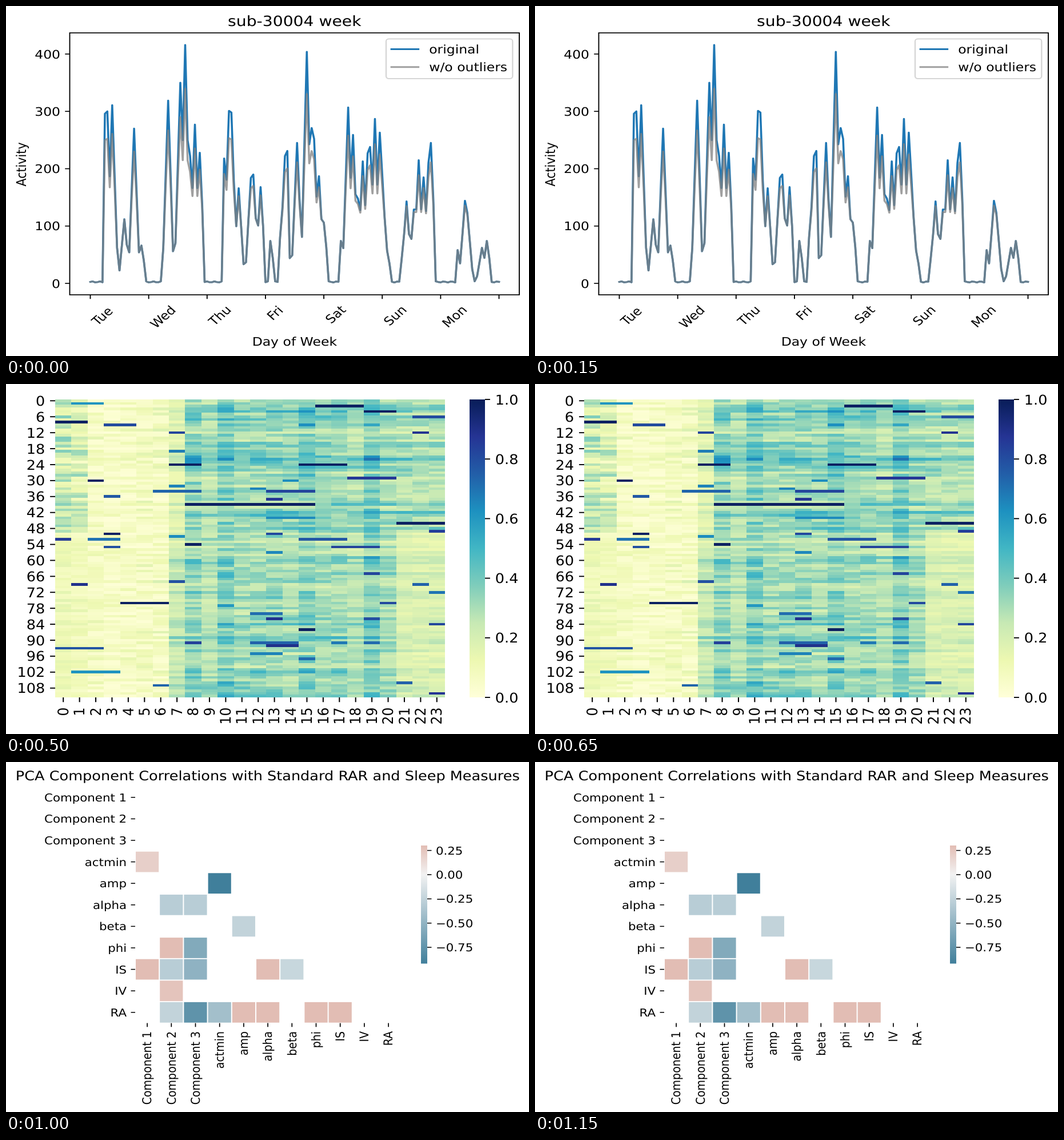
Write an HTML page that moves like this. It is 915 px wide and 612 px high and loops after 1250 ms.

```html
<!DOCTYPE html>
<html lang="en">
<head>
<meta charset="utf-8">
<title>Activity charts</title>
<style>
  html, body { margin: 0; width: 100%; height: 100%; overflow: hidden; background: #fff; }
  svg { display: block; width: 915px; height: 612px; font: 10px "DejaVu Sans", sans-serif; text-rendering: geometricPrecision; }
  .scene { visibility: hidden; animation: show 1250ms step-end infinite; }
  @keyframes show { 0% { visibility: visible; } 20%, 100% { visibility: hidden; } }
</style>
</head>
<body>
<svg viewBox="0 0 915 612"></svg>
<script>
const svg = document.querySelector('svg');
const BLUE = '#1f77b4', ORANGE = '#ff7f0e', GREEN = '#2ca02c', GRAY = '#808080';
const range = (n, f = i => i) => Array.from({ length: n }, (_, i) => f(i));

function add(parent, tag, attrs, text) {
  const node = document.createElementNS('http://www.w3.org/2000/svg', tag);
  for (const k in attrs) node.setAttribute(k, attrs[k]);
  if (text !== undefined) node.textContent = text;
  return parent.appendChild(node);
}

// A chart drawn in points (sx, sy pixels each); helpers take stage pixels.
let sceneCount = 0;
function scene(sx, sy) {
  const g = add(svg, 'g', {
    class: 'scene', transform: `scale(${sx} ${sy})`,
    style: `animation-delay:${(sceneCount++ - 5) * 250}ms`
  });
  const s = {
    g,
    line(points, stroke, more) {
      const d = 'M' + points.map(([x, y]) => `${x / sx} ${y / sy}`).join('L');
      add(g, 'path', {
        d, stroke, fill: 'none', 'stroke-width': 1.5,
        'stroke-linejoin': 'round', 'stroke-linecap': 'square', ...more
      });
    },
    rect(x, y, w, h, attrs) {
      add(g, 'rect', { x: x / sx, y: y / sy, width: w / sx, height: h / sy, ...attrs });
    },
    text(str, x, y, anchor = 'middle', turn = 0, size = 10) {
      add(g, 'text', {
        transform: `translate(${x / sx} ${y / sy}) rotate(${turn})`,
        'text-anchor': anchor, 'font-size': size
      }, str);
    },
    frame(x0, y0, x1, y1) {
      s.rect(x0, y0, x1 - x0, y1 - y0, { fill: 'none', stroke: '#000', 'stroke-width': 0.8 });
    },
    tick(x, y, dx, dy) {
      s.line([[x, y], [x + dx * 3.5 * sx, y + dy * 3.5 * sy]], '#000',
        { 'stroke-width': 0.8, 'stroke-linecap': 'butt' });
    },
    xTick(x, y, label) {
      s.tick(x, y, 0, 1);
      s.text(label, x, y + 15 * sy);
    },
    xTickTurned(x, y, label) {
      s.tick(x, y, 0, 1);
      s.text(label, x + 3.4 * sx, y + 7.5 * sy, 'end', -90);
    },
    yTick(x, y, label, side = -1) {
      s.tick(x, y, side, 0);
      s.text(label, x + side * 7 * sx, y + 3.65 * sy, side < 0 ? 'end' : 'start');
    },
    legend(x, y, w, h, firstY, stepY, items) {
      s.rect(x, y, w, h, { rx: 2, fill: '#fff', 'fill-opacity': 0.8, stroke: '#ccc', 'stroke-opacity': 0.8 });
      items.forEach(([label, color, more], i) => {
        const ly = firstY + i * stepY, lx = x + 4 * sx;
        s.line([[lx, ly], [lx + 20 * sx, ly]], color, more);
        s.text(label, lx + 28 * sx, ly + 3.5 * sy, 'start');
      });
    }
  };
  return s;
}

const mix = (a, b, t) => `rgb(${a.map((v, i) => Math.round(v + (b[i] - v) * t))})`;

function gradient(s, id, stops) {
  const grad = add(s.g, 'linearGradient', { id, x1: 0, y1: 0, x2: 0, y2: 1 });
  stops.forEach(([offset, color]) => add(grad, 'stop', { offset, 'stop-color': color }));
}

// Bursts of activity in each waking stretch, as hour of week: height.
const bursts = [
  { 6: 296, 7: 300, 9: 311, 14: 112, 18: 270, 21: 66 },
  { 30: 62, 32: 319, 34: 56, 37: 350, 39: 416, 41: 223, 43: 277, 45: 228 },
  { 55: 218, 57: 301, 58: 298, 61: 166, 66: 184, 67: 190, 70: 168 },
  { 74: 74 },
  { 78: 80, 80: 222, 81: 231, 82: 44, 85: 245, 89: 404, 91: 271, 92: 252, 94: 187, 96: 106 },
  { 103: 74, 106: 307, 108: 259, 110: 148, 112: 213, 114: 227, 115: 238, 117: 287, 119: 263, 120: 190, 122: 57 },
  { 128: 43, 130: 143, 133: 129, 135: 215, 137: 185, 139: 210, 140: 245 },
  { 151: 58, 154: 144, 155: 123, 161: 62, 163: 74 }
];

// Each burst fades over about two hours on either side; sleep stays near zero.
function weekValues() {
  const values = range(169, i => 2.5 + Math.sin(i * 2));
  for (const stretch of bursts) {
    const hours = Object.keys(stretch).map(Number);
    for (let h = hours[0]; h <= hours.at(-1) + 1; h++) {
      const tents = hours.map(k => stretch[k] * (1 - 0.4 * Math.abs(h - k)));
      values[h] = stretch[h] ?? Math.max(values[h], ...tents);
    }
  }
  return values;
}

function week() {
  const s = scene(2.35, 2.065);
  const px = h => 147.5 + h * 4.256, py = v => 485 - v * 1.0025;
  const values = weekValues();
  const trim = v => v - 0.25 * Math.max(0, v - 110);
  const soft = { 'stroke-opacity': 0.75 };
  s.line(values.map((v, i) => [px(i), py(v)]), BLUE);
  s.line(values.map((v, i) => [px(i), py(trim(v))]), GRAY, soft);
  s.frame(111.5, 47, 898, 505);
  for (let v = 0; v <= 400; v += 100) s.yTick(111.5, py(v), v);
  const names = { Tue: 18.6, Wed: 22, Thu: 18.8, Fri: 12.5, Sat: 16.4, Sun: 19, Mon: 21.1 };
  Object.entries(names).forEach(([name, width], i) =>
    s.text(name, px(i * 24) + 12.6, 521.5 + (width + 7.6) * 1.46, 'start', -45));
  range(8, i => s.tick(px(i * 24), 505, 0, 1));
  s.text('sub-30004 week', 504.8, 35, 'middle', 0, 12);
  s.text('Day of Week', 504.8, 593.5);
  s.text('Activity', 35, 277, 'middle', -90);
  s.legend(665, 57.5, 221.3, 69.5, 75.5, 31.2, [['original', BLUE], ['w/o outliers', GRAY, soft]]);
}

function dayProfile() {
  const s = scene(2.35, 2.164);
  const px = h => 147.5 + h * 31.1, py = v => 510 - v * 2.1875;
  const steps = a => a.flatMap((v, i) => i ? [[px(i), py(a[i - 1])], [px(i), py(v)]] : [[px(0), py(v)]]);
  const hourly = [44, 10, 21, 2, 2, 10.5, 69.5, 146, 138, 181, 176, 144.5,
    139, 167.5, 114, 155, 148, 201, 194.5, 197, 162.5, 118, 111.5, 56];
  // Outliers weigh most in the morning.
  const trim = (v, h) => v * (h < 6 ? 0.96 : Math.min(0.92, 0.81 + 0.02 * (h - 6)));
  s.line(steps(hourly), BLUE);
  s.line(steps(hourly.map(trim)), GRAY);
  s.frame(111.5, 48.5, 898, 528);
  for (let v = 0; v <= 200; v += 25) s.yTick(111.5, py(v), v);
  for (let h = 0; h <= 20; h += 5) s.xTick(px(h), 528, h);
  s.text('sub-30004 24 hr', 504.8, 36, 'middle', 0, 12);
  s.text('Hour', 504.8, 593);
  s.text('Activity', 35, 289, 'middle', -90);
  s.legend(123, 59.5, 221.3, 39.8, 79, 0, [['w/o outliers', GRAY]]);
}

// Hourly means in thousandths for the high and low groups.
const high = [265, 187, 132, 86, 94, 125, 141, 254, 460, 388, 523, 428,
  440, 459, 439, 528, 456, 466, 428, 537, 433, 351, 333, 341];
const low = [210, 205, 171, 155, 168, 205, 200, 252, 312, 248, 328, 275,
  283, 273, 250, 295, 263, 250, 203, 316, 241, 198, 197, 219];
const mean = high.map((v, i) => (v + low[i]) / 2);

const ramp = [[255, 255, 217], [237, 248, 177], [199, 233, 180], [127, 205, 187], [65, 182, 196],
  [29, 145, 192], [34, 94, 168], [37, 52, 148], [8, 29, 88]];
function rampColor(v) {
  const t = Math.min(1, Math.max(0, v)) * 8, i = Math.min(7, Math.floor(t));
  return mix(ramp[i], ramp[i + 1], t - i);
}

function heatValues() {
  let seed = 4217;
  const rand = () => (seed = seed * 16807 % 2147483647) / 2147483647;
  const rows = range(112, r => {
    const late = r >= 50;
    const wave = Math.cos((r - 2) / 20.6 * 2 * Math.PI) * (1 - r / 150);
    const gain = (1 + 0.2 * wave) * (0.75 + 0.4 * rand());
    let drift = 0.5;
    return mean.map((m, h) => {
      const base = m / 1000;
      drift += (rand() - drift) * 0.6;
      if (h < 2) return base * (late ? 0.15 + 0.7 * drift : 0.2 + 2 * drift ** 1.4);
      if (h < 7) return base * (0.05 + 1.4 * drift ** 2);
      const season = h === 7 ? (late ? 1.1 : 0.7) : h > 20 ? (late ? 0.8 : 1.15) : 1;
      return base * gain * season * (0.55 + 0.85 * drift);
    });
  });
  // Scattered short streaks, mostly in waking hours.
  for (let i = 0; i < 50; i++) {
    const r = Math.floor(rand() * 112), c = Math.floor(24 * rand() ** 0.8);
    rows[r].fill(0.6 + 0.3 * rand(), c, c + 1 + Math.floor(3 * rand() ** 2));
  }
  // The longest dark streaks: row, first column, length.
  [[2, 16, 3], [4, 19, 2], [8, 0, 2], [24, 7, 2], [24, 15, 3], [30, 2, 1], [39, 8, 8],
    [46, 21, 3], [50, 3, 1], [54, 8, 1], [76, 4, 3], [86, 15, 1]]
    .forEach(([r, c, n]) => rows[r].fill(0.98, c, c + n));
  return rows;
}

function heatmap() {
  const s = scene(2.547, 2.35);
  const left = 86, top = 27, w = 682 / 24, h = 521 / 112;
  heatValues().forEach((row, r) => row.forEach((v, c) =>
    s.rect(left + c * w, top + r * h, w, h, { fill: rampColor(v), 'shape-rendering': 'crispEdges' })));
  for (let r = 0; r <= 108; r += 6) s.yTick(left, top + (r + 0.5) * h, r);
  range(24, c => s.xTickTurned(left + (c + 0.5) * w, 548, c));
  gradient(s, 'ramp', ramp.map((c, i) => [1 - i / 8, `rgb(${c})`]).reverse());
  s.rect(811, top, 27, 521, { fill: 'url(#ramp)' });
  range(6, i => s.yTick(838, 548 - i * 104.2, (i / 5).toFixed(1), 1));
}

function groups() {
  const s = scene(2.461, 2.408);
  const px = h => 112 + h * 32.53, py = v => 620.05 - v * 1.0755;
  const curves = [['High PC1', BLUE, high], ['Mean', ORANGE, mean], ['Low PC1', GREEN, low]];
  curves.forEach(([, color, data]) => s.line(data.map((v, i) => [px(i), py(v)]), color));
  s.frame(74.5, 18, 898, 552);
  for (let v = 1; v <= 5; v++) s.yTick(74.5, py(v * 100), (v / 10).toFixed(1));
  for (let h = 0; h <= 20; h += 5) s.xTick(px(h), 552, h);
  s.legend(86.8, 30, 200.2, 119, 51, 37, curves.map(([label, color]) => [label, color]));
}

function correlations() {
  const s = scene(2.13, 1.9);
  const left = 226, top = 43, w = 42.2, h = 37.6;
  const cold = [64, 127, 155], plain = [242, 242, 242], warm = [226, 189, 180];
  const color = v => v < 0 ? mix(plain, cold, v / -0.92) : mix(plain, warm, v / 0.3);
  // Row: { column: coefficient }
  const cells = {
    3: { 0: 0.2 }, 4: { 3: -0.92 }, 5: { 1: -0.3, 2: -0.3 }, 6: { 4: -0.25 }, 7: { 1: 0.3, 2: -0.58 },
    8: { 0: 0.3, 1: -0.3, 2: -0.51, 5: 0.3, 6: -0.22 }, 9: { 1: 0.26 },
    10: { 1: -0.25, 2: -0.76, 3: -0.41, 4: 0.3, 5: 0.3, 7: 0.3, 8: 0.3 }
  };
  for (const r in cells) for (const c in cells[r])
    s.rect(left + c * w + 1, top + r * h + 0.9, w - 2, h - 1.8, { fill: color(cells[r][c]) });
  const names = ['Component 1', 'Component 2', 'Component 3', 'actmin', 'amp', 'alpha', 'beta', 'phi', 'IS', 'IV', 'RA'];
  names.forEach((name, i) => {
    s.yTick(left, top + (i + 0.5) * h, name);
    s.xTickTurned(left + (i + 0.5) * w, top + 11 * h, name);
  });
  gradient(s, 'diverging', [[0, color(0.3)], [0.247, color(0)], [1, color(-0.92)]]);
  s.rect(726, 146, 11, 206.5, { fill: 'url(#diverging)' });
  range(5, i => {
    const v = 0.25 - i * 0.25;
    s.yTick(737, 197 - v * 169.4, v.toFixed(2).replace('-', '\u2212'), 1);
  });
  s.text('PCA Component Correlations with Standard RAR and Sleep Measures', 457.8, 31.6, 'middle', 0, 12);
}

week();
dayProfile();
heatmap();
groups();
correlations();
</script>
</body>
</html>
```
